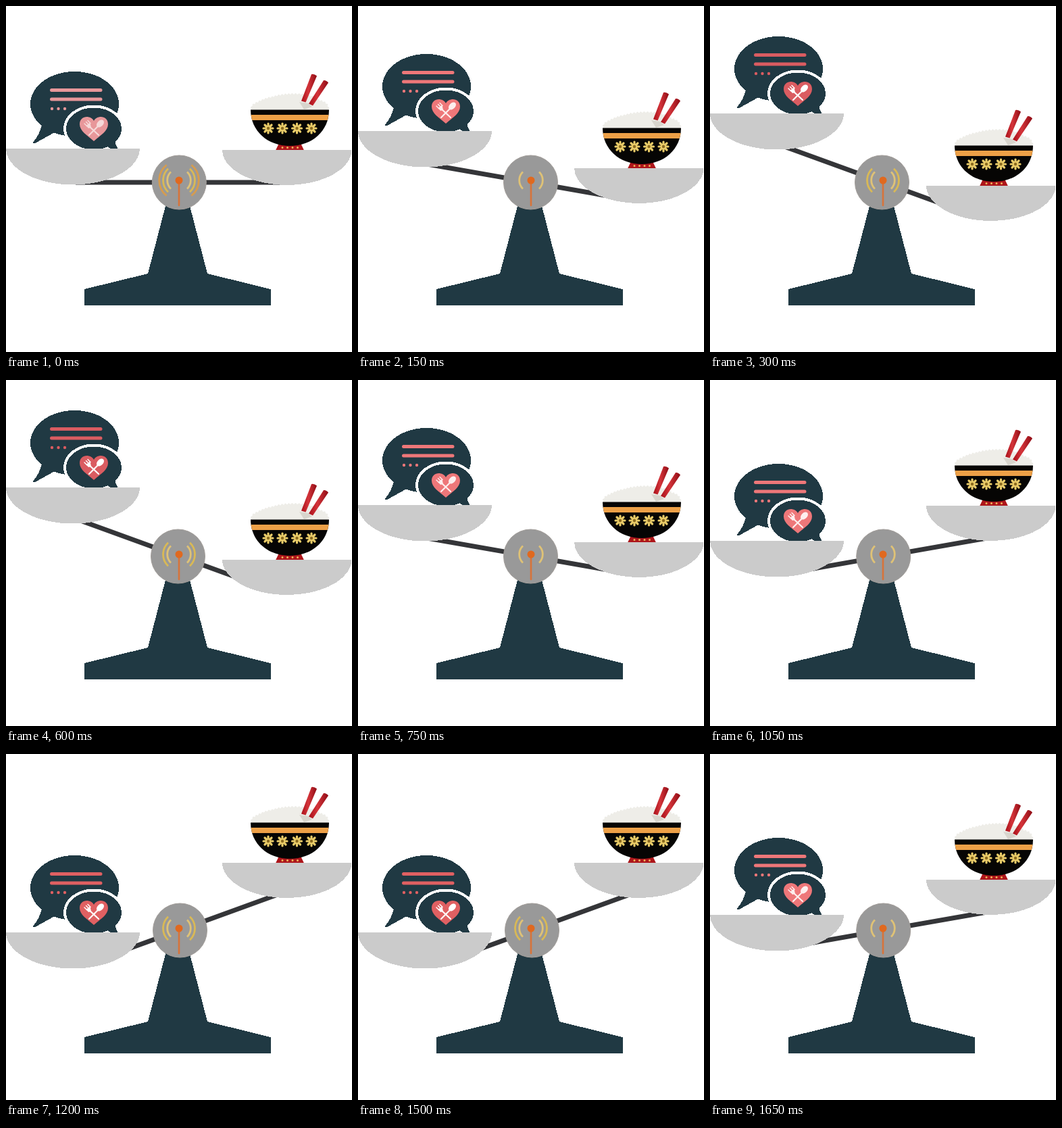
Recreate the animation shown at these times as an HTML page. Size 512 by 512 pixels, loop 1.8 s.

```html
<!DOCTYPE html>
<html lang="en">
<head>
<meta charset="utf-8">
<title>Balance scale</title>
<style>
html, body { margin: 0; width: 100%; height: 100%; overflow: hidden; background: #fff; }
svg { display: block; width: 100vw; height: 100vh; animation: tilt 1800ms step-end infinite; }

/* --a beam angle, --l and --r pan offsets, --dx hub shift, --c accent, --n visible waves */
@keyframes tilt {
  0%, 50%, 100%      { --a: 0deg;   --l: 0px;   --r: 0px;   --dx: .3px;   --c: #e8979a; --cut: #f6d9d9; --n: 3; }
  8.3333%, 41.6667%  { --a: 10deg;  --l: -26px; --r: 27px;  --dx: -.5px;  --c: #ee7779; --cut: #fdeeee; --n: 1; }
  16.6667%, 33.3333% { --a: 20deg;  --l: -52px; --r: 53px;  --dx: -1.5px; --c: #da5c61; --cut: #fff;    --n: 2; }
  25%                { --a: 30deg;  --l: -75px; --r: 77px;  --dx: -2px;   --c: #cb444b; --cut: #fff;    --n: 3; }
  58.3333%, 91.6667% { --a: -10deg; --l: 27px;  --r: -27px; --dx: .7px;   --c: #ee7779; --cut: #fdeeee; --n: 1; }
  66.6667%, 83.3333% { --a: -20deg; --l: 53px;  --r: -52px; --dx: 1.5px;  --c: #e06062; --cut: #fff;    --n: 2; }
  75%                { --a: -30deg; --l: 77px;  --r: -75px; --dx: 2px;    --c: #cb444b; --cut: #fff;    --n: 3; }
}
.beam { transform-origin: 256px 261px; transform: rotate(var(--a)); }
.left { transform: translateY(var(--l)); }
.right { transform: translateY(var(--r)); }
.hub { transform: translateX(var(--dx)); }
.wave { fill: none; stroke-width: 2.8; opacity: clamp(0, var(--n) - var(--i), 1); }
.accent { fill: var(--c); }
.rule { stroke: var(--c); }
.cut { fill: var(--cut); stroke: var(--cut); }
.dark { fill: #203943; }
.pan { fill: #cbcbcb; }
.dark, .pan { shape-rendering: crispEdges; }
</style>
</head>
<body>
<svg viewBox="0 0 512 512">
  <defs>
    <g id="flower" stroke="#e9cb68" stroke-width="3.2" stroke-linecap="round">
      <path d="M0-7V7M-7 0H7M-5-5L5 5M-5 5L5-5"/>
      <circle r="2.2" fill="#8a6a20" stroke="none"/>
    </g>
    <clipPath id="bowl"><path d="M362 153.500H478C478 185 453 207 420 207S362 185 362 153.500Z"/></clipPath>
    <linearGradient id="lacquer">
      <stop offset="0" stop-color="#a80f19"/>
      <stop offset=".45" stop-color="#d4343a"/>
      <stop offset="1" stop-color="#8e0b14"/>
    </linearGradient>
  </defs>

  <path class="beam" d="M103 261H409" stroke="#343538" stroke-width="7"/>
  <path class="dark" d="M242 273L236 296 210 396 116 419V443H391.500V419L298 396 272 296 266 273Z"/>

  <g class="left">
    <g class="dark">
      <ellipse cx="101.5" cy="145" rx="65.5" ry="48"/>
      <path d="M53 176Q50 190 40 201.500Q39 205 44 202.500L70 188L82 186Z"/>
      <ellipse cx="130" cy="181.500" rx="43" ry="33" stroke="#fff" stroke-width="4"/>
      <ellipse cx="130" cy="181.500" rx="41" ry="31"/>
      <path d="M146 206L161 198Q162 206 166 212H157Z"/>
    </g>
    <path class="rule" d="M67.5 124.5H140M67.5 138H140" stroke-width="5" stroke-linecap="round"/>
    <g class="accent">
      <circle cx="68" cy="152" r="2.2"/>
      <circle cx="77.5" cy="152" r="2.2"/>
      <circle cx="87" cy="152" r="2.2"/>
      <path d="M130 170C125 161 109 162 109 175C109 185 120 191 130 200C140 191 151 185 151 175C151 162 135 161 130 170Z"/>
    </g>
    <g class="cut" stroke-width="2.2" stroke-linecap="round">
      <path d="M137 177L123 191M122 177L137 191"/>
      <ellipse cx="139.5" cy="174" rx="6.5" ry="4.3" stroke="none" transform="rotate(-45 139.5 174)"/>
      <path d="M116 174L120 178M118.5 171.500L123 176M121 169.500L125 173.500" stroke-width="1.5"/>
      <path d="M118.500 177L124.500 172.500L126 180L122 181Z" stroke="none"/>
    </g>
    <path class="pan" d="M0 211H198C198 240 154 264.5 99 264.5S0 240 0 211Z"/>
  </g>

  <g class="right">
    <path d="M363 155Q362 146 372 143Q382 137 394 135Q410 130 430 130.500Q452 131 464 140Q478 143 477 155Z"
      fill="#eeede8" stroke="#eeede8" stroke-width="3" stroke-dasharray="0 5" stroke-linecap="round"/>
    <path d="M434 142L447 144 453 149 441 153Z" fill="#d8d5cd"/>
    <path d="M452 101Q456 100 460 103.500L443.500 142.500 437 140.500Z" fill="url(#lacquer)"/>
    <path d="M470 110Q474 109.500 477 113.500L454 147.500 448 144.500Z" fill="url(#lacquer)"/>
    <path d="M404 203H436L441 213.500H399Z" fill="#ad161b"/>
    <path d="M409 209.500H432" stroke="#efb65c" stroke-width="3" stroke-dasharray="0 7.500" stroke-linecap="round"/>
    <g clip-path="url(#bowl)">
      <path d="M360 150H480V210H360Z" fill="#060504"/>
      <path d="M360 165H480" stroke="#eda047" stroke-width="8"/>
    </g>
    <use href="#flower" x="388" y="181"/>
    <use href="#flower" x="409" y="181"/>
    <use href="#flower" x="430.500" y="181"/>
    <use href="#flower" x="452" y="181"/>
    <path class="pan" d="M320 213H511.500C511.500 241 469 265 416 265S320 241 320 213Z"/>
  </g>

  <circle class="hub" cx="256" cy="261" r="40" fill="#999" stroke="#a39e9a"/>
  <g id="waves"></g>
  <path d="M256 258V295" stroke="#d8743a" stroke-width="2.6" stroke-linecap="round"/>
  <circle cx="256" cy="258" r="5.5" fill="#e0691f"/>
</svg>
<script>
// Each wave is a pair of arcs mirrored about the antenna.
const waves = [[17.3, 46, "#dfc276"], [23.5, 47, "#d9b955"], [29.3, 51, "#d69c4e"]];
document.getElementById("waves").innerHTML = waves.map(([r, deg, color], i) => {
  const x = r * Math.cos(deg * Math.PI / 180), y = r * Math.sin(deg * Math.PI / 180);
  const arc = (s, sweep) => `M${256 + s * x} ${258 - y}A${r} ${r} 0 0 ${sweep} ${256 + s * x} ${258 + y}`;
  return `<path class="wave" style="--i:${i}" stroke="${color}" d="${arc(1, 1)}${arc(-1, 0)}"/>`;
}).join("");
</script>
</body>
</html>
```
